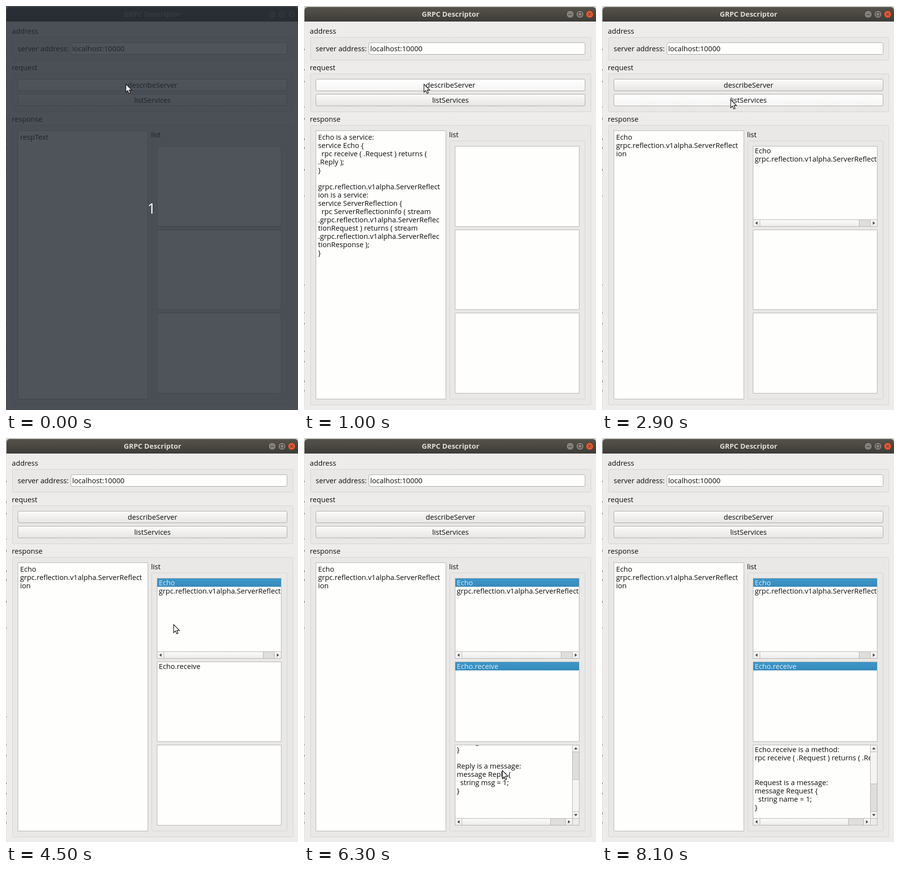
These frames come from a looping animation (600 by 831 pixels, 8200 ms). An HTML page with a canvas:

```html
<!DOCTYPE html>
<html lang="en">
<head>
<meta charset="utf-8">
<title>GRPC Descriptor</title>
<style>
html, body { margin: 0; width: 100%; height: 100%; overflow: hidden; background: #eeeceb; }
canvas { display: block; }
</style>
</head>
<body>
<canvas id="stage" width="600" height="831"></canvas>
<script>
const ctx = document.getElementById('stage').getContext('2d');
const LOOP = 8200, STEP = 100, LINE = 17;
const FONT = '14.7px "Open Sans", "Noto Sans", sans-serif';
const WHITE = '#fefefd', EDGE = '#b4b2b0';

const described = `Echo is a service:
service Echo {
  rpc receive ( .Request ) returns (
.Reply );
}

grpc.reflection.v1alpha.ServerReflect
ion is a service:
service ServerReflection {
  rpc ServerReflectionInfo ( stream
.grpc.reflection.v1alpha.ServerReflec
tionRequest ) returns ( stream
.grpc.reflection.v1alpha.ServerReflec
tionResponse );
}`;
const listed = 'Echo\ngrpc.reflection.v1alpha.ServerReflect\nion';
const services = 'Echo\ngrpc.reflection.v1alpha.ServerReflection';
const method = `Echo.receive is a method:
rpc receive ( .Request ) returns ( .Reply );


Request is a message:
message Request {
  string name = 1;
}

Reply is a message:
message Reply {
  string msg = 1;
}`;

// Pointer moves: first step, last step, destination
const moves = [
  [1200, 1400, 262, 243], [1600, 1900, 262, 254], [2000, 2300, 264, 223],
  [2500, 2700, 264, 192], [3100, 3200, 245, 207], [3400, 3700, 312, 343],
  [3800, 4000, 320, 297], [4500, 4500, 344, 383], [4700, 5000, 347, 465],
  [5600, 5900, 376, 677], [6100, 6300, 407, 683], [7400, 7500, 201, 207],
  [7700, 7900, 4, 23]
];
// Time and first visible line of the method text
const scrolls = [[6100, 3], [6200, 6], [6300, 7], [6600, 4], [6800, 0]];

function pointerAt(t) {
  let x = 246, y = 160;
  for (const [start, end, toX, toY] of moves) {
    if (t < start) break;
    const u = Math.min(1, (t - start + STEP) / (end - start + STEP));
    x += (toX - x) * u;
    y += (toY - y) * u;
  }
  return [Math.round(x), Math.round(y)];
}

function gradient(y0, y1, top, bottom) {
  const g = ctx.createLinearGradient(0, y0, 0, y1);
  g.addColorStop(0, top);
  g.addColorStop(1, bottom);
  return g;
}

function rect(x, y, x2, y2, fill) {
  ctx.fillStyle = fill;
  ctx.fillRect(x, y, x2 - x, y2 - y);
}

// Bordered box given by its outer pixel edges
function box(x, y, x2, y2, fill, edge = EDGE, r = 0) {
  ctx.beginPath();
  ctx.roundRect(x + .5, y + .5, x2 - x - 1, y2 - y - 1, r);
  ctx.fillStyle = fill;
  ctx.fill();
  ctx.strokeStyle = edge;
  ctx.lineWidth = 1;
  ctx.stroke();
}

function text(str, x, y, color = '#0c0c0c', align = 'left', font = FONT) {
  ctx.font = font;
  ctx.textAlign = align;
  ctx.fillStyle = color;
  str.split('\n').forEach((line, i) => {
    const indent = line.length - line.trimStart().length;
    ctx.fillText(line.trimStart(), x + indent * 3.5, y + i * LINE);
  });
}

function clipped(x, y, x2, y2, draw) {
  ctx.save();
  ctx.beginPath();
  ctx.rect(x, y, x2 - x, y2 - y);
  ctx.clip();
  draw();
  ctx.restore();
}

function group(label, x, y, x2, y2) {
  box(x, y, x2, y2, '#e9e8e6', '#d5d3d1', 2);
  text(label, x - 1, y - 7);
}

function button(label, y, pointer, pressed) {
  const [px, py] = pointer;
  const hover = px > 24 && px < 578 && py > y && py < y + 25;
  const [top, bottom] = pressed ? ['#d9d7d5', '#dddbd9']
    : hover ? ['#ffffff', '#f5f4f3'] : ['#fbfbfa', '#e7e5e4'];
  box(24, y, 578, y + 25, gradient(y, y + 25, top, bottom), '#aaa8a6', 2.5);
  text(label, 301, y + 18, '#0c0c0c', 'center');
}

function arrow(x, y, angle) {
  ctx.save();
  ctx.translate(x, y);
  ctx.rotate(angle * Math.PI / 2);
  ctx.fillStyle = '#444';
  ctx.beginPath();
  ctx.moveTo(2.5, 0);
  ctx.lineTo(-2, -3.5);
  ctx.lineTo(-2, 3.5);
  ctx.fill();
  ctx.restore();
}

function hScroll(y, x2, thumbEnd) {
  const face = gradient(y, y + 15, '#fcfcfb', '#ecebe9');
  box(310, y, x2, y + 15, '#dfdedc');
  box(310, y, 325, y + 15, face);
  box(324, y, thumbEnd, y + 15, face);
  box(x2 - 15, y, x2, y + 15, face);
  arrow(317.5, y + 7.5, 2);
  arrow(x2 - 7.5, y + 7.5, 0);
}

function vScroll(thumbY) {
  box(551, 631, 566, 783, '#dfdedc');
  for (const [y, y2] of [[631, 646], [thumbY, thumbY + 67], [768, 783]])
    box(551, y, 566, y2, '#f5f4f3');
  arrow(558.5, 638.5, 3);
  arrow(558.5, 775.5, 1);
}

function item(label, y, selected) {
  if (selected) rect(311, y, 565, y + 17, gradient(y, y + 17, '#3d96c8', '#368abb'));
  text(label, 314, y + 14, selected ? '#dceef7' : '#0c0c0c');
}

function titleBar(focused) {
  rect(0, 0, 600, 10, '#d2d1ce');
  ctx.beginPath();
  ctx.roundRect(1, 2, 599, 30, [7, 7, 0, 0]);
  ctx.fillStyle = focused ? gradient(2, 32, '#55534b', '#3d3c37') : gradient(2, 32, '#42423d', '#3b3a36');
  ctx.fill();
  text('GRPC Descriptor', 301, 22, focused ? '#dfdbd2' : '#807e77', 'center',
    'bold 14.5px "Open Sans", "Noto Sans", sans-serif');
  [547, 567, 587].forEach((x, i) => {
    ctx.beginPath();
    ctx.arc(x, 17, 7.8, 0, 7);
    ctx.fillStyle = !focused ? '#5e5d57' : i === 2 ? '#e4582f' : '#85827a';
    ctx.fill();
    ctx.strokeStyle = '#34332f';
    ctx.lineWidth = 1;
    ctx.stroke();
    ctx.beginPath();
    if (i === 0) { ctx.moveTo(x - 4, 17.5); ctx.lineTo(x + 4, 17.5); }
    if (i === 1) ctx.rect(x - 3.5, 13.5, 7, 7);
    if (i === 2) {
      ctx.moveTo(x - 3, 14); ctx.lineTo(x + 3, 20);
      ctx.moveTo(x + 3, 14); ctx.lineTo(x - 3, 20);
    }
    ctx.stroke();
  });
}

function cursor(x, y) {
  ctx.save();
  ctx.translate(x + .5, y + .8);
  ctx.beginPath();
  [[0, 0], [0, 16.5], [3.8, 13], [6.2, 19], [9, 17.8], [6.6, 12], [11.8, 12]]
    .forEach(p => ctx.lineTo(...p));
  ctx.closePath();
  ctx.fillStyle = '#fff';
  ctx.strokeStyle = '#111';
  ctx.lineWidth = 1.2;
  ctx.fill();
  ctx.stroke();
  ctx.restore();
}

function draw(t) {
  const pointer = pointerAt(t);
  rect(0, 0, 600, 831, '#eeeceb');
  rect(0, 0, 1, 831, '#e2e0de');
  for (const y of [88, 130, 154, 207, 230, 272, 290, 335, 390, 573, 630, 652, 709, 730, 770, 790])
    rect(0, y, 1, y + 2 + y % 3, '#555');
  titleBar(t >= 700);

  group('address', 13, 64, 590, 112);
  text('server address:', 24, 93);
  box(133, 75, 578, 100, WHITE, '#aeacaa', 2.5);
  text('localhost:10000', 136, 93);

  group('request', 13, 139, 590, 218);
  button('describeServer', 150, pointer, t >= 800 && t < 1000);
  button('listServices', 181, pointer, t >= 2700 && t < 2900);

  group('response', 13, 245, 590, 821);
  box(24, 256, 292, 809, WHITE);
  text(t < 1000 ? 'respText' : t < 2900 ? described : listed, 29, 275);

  group('list', 299, 277, 578, 809);
  box(310, 288, 566, 454, WHITE);
  box(310, 460, 566, 625, WHITE);
  box(310, 631, 566, 797, WHITE);
  if (t >= 2900) {
    clipped(311, 289, 565, 439, () => {
      const [first, second] = services.split('\n');
      item(first, 289, t >= 4100);
      item(second, 306);
    });
    hScroll(439, 566, 529);
  }
  if (t >= 4500) item('Echo.receive', 461, t >= 5100);
  if (t >= 5200) {
    let top = 0;
    for (const [at, line] of scrolls) if (t >= at) top = line;
    clipped(311, 632, 551, 782, () => text(method, 314, 646 - top * LINE));
    rect(551, 782, 565, 796, '#eeeceb');
    vScroll(645 + Math.round(top * 57 / 7));
    hScroll(782, 552, 507);
  }

  if (t < 500) {
    rect(0, 0, 600, 831, 'rgba(36,42,50,.8)');
    text('1', 299, 427, '#fff', 'center', '30px "Open Sans", "Noto Sans", sans-serif');
  }
  if (t < 8100) cursor(...pointer);
}

const begin = performance.now();
function tick() {
  const t = Math.max(0, performance.now() - begin) % LOOP;
  draw(Math.floor(t / STEP) * STEP);
  requestAnimationFrame(tick);
}
tick();
</script>
</body>
</html>
```
